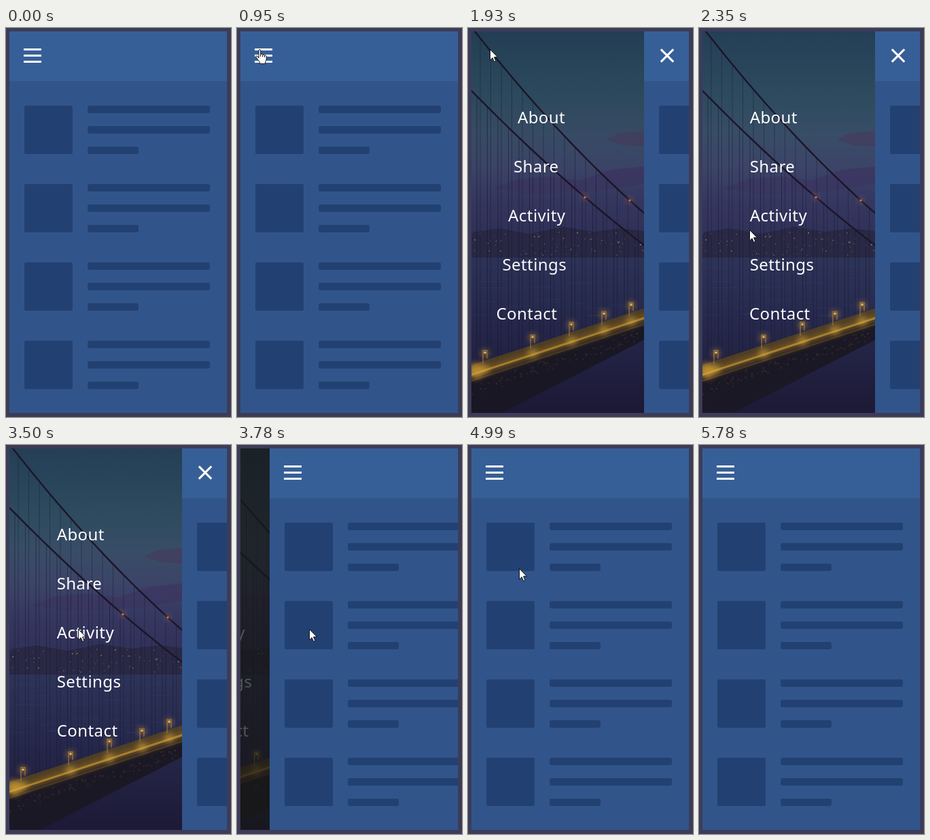
An HTML page for the animation above (6.13 s loop, 331x571 px).

```html
<!DOCTYPE html>
<html lang="en">
<head>
<meta charset="utf-8">
<title>Slide-out menu</title>
<style>
  html, body { margin: 0; width: 100%; height: 100%; overflow: hidden; background: #3c3c58; }
  svg { display: block; width: 331px; height: 571px; }
  text { font: 24px "Noto Sans", "Open Sans", sans-serif; letter-spacing: .42px; fill: #fff; }
</style>
</head>
<body>
<svg viewBox="0 0 331 571">
  <defs>
    <clipPath id="screen"><rect x="5" y="5" width="320" height="560"/></clipPath>
    <linearGradient id="sky" x2="0" y2="1">
      <stop offset="0" stop-color="#243f56"/>
      <stop offset=".3" stop-color="#2e4b5f"/>
      <stop offset=".45" stop-color="#384d66"/>
      <stop offset=".6" stop-color="#3c4468"/>
      <stop offset=".75" stop-color="#353760"/>
      <stop offset="1" stop-color="#2e2d55"/>
    </linearGradient>
    <linearGradient id="water" x2="0" y2="1">
      <stop offset="0" stop-color="#2d3459"/>
      <stop offset=".4" stop-color="#26294d"/>
      <stop offset="1" stop-color="#1d1936"/>
    </linearGradient>
    <filter id="soft" x="-50%" y="-50%" width="200%" height="200%"><feGaussianBlur stdDeviation="4"/></filter>
  </defs>
  <rect width="331" height="571" fill="#3c3c58"/>
  <g clip-path="url(#screen)">
    <rect x="5" y="5" width="320" height="560" fill="#171717"/>
    <g id="menu"><g id="scene"></g><g id="labels"></g></g>
    <g id="pane">
      <rect x="5" y="5" width="320" height="560" fill="#31558a"/>
      <rect x="5" y="5" width="320" height="73" fill="#375f97"/>
    </g>
  </g>
  <g id="cursor" fill="#fff" stroke="#111">
    <path id="arrow" d="M.5 .5V16.2L4.1 12.8 6.6 18.5 9 17.5 6.5 11.8H11.5Z"/>
    <g id="hand" transform="translate(-5)">
      <path d="M5 13V2Q5 .6 6.3 .6T7.7 2V7.5Q9.8 6.4 10.6 8.2 12.6 7.3 13.4 9.2 16.2 8.5 16.2 11V15Q16 17.5 14.6 19V21.4H6.6V19.3Q4.7 17.2 3 14.5L.8 11.5Q.6 9.6 2.6 10Z"/>
      <path d="M7.7 7.5V11M10.6 8.5V11.5M13.4 9.4V12"/>
    </g>
  </g>
</svg>
<script>
const LOOP = 6130;
const PANE_SHIFT = 254, SCENE_SHIFT = 80, LABEL_SHIFT = 177;
const OPEN_AT = 1415, CLOSE_AT = 3495;
const $ = id => document.getElementById(id);

function add(parent, tag, attrs) {
  const node = document.createElementNS('http://www.w3.org/2000/svg', tag);
  for (const name in attrs) node.setAttribute(name, attrs[name]);
  return parent.appendChild(node);
}
const path = (d, attrs) => add($('scene'), 'path', { d, fill: 'none', ...attrs });
const dot = (cx, cy, r, fill, attrs) => add($('scene'), 'circle', { cx, cy, r, fill, ...attrs });
const rect = (parent, x, y, width, height, fill, rx = 0) =>
  add(parent, 'rect', { x, y, width, height, fill, rx });

let seed = 11;
const random = () => (seed = seed * 16807 % 2147483647) / 2147483647;
const between = (low, high) => low + (high - low) * random();

const upperCable = x => 5 + 1.27 * (x - 10) - .0008 * (x - 10) ** 2;
const lowerCable = x => 92 + 1.02 * (x - 5) - .0005 * (x - 5) ** 2;
const deck = x => 507 - .327 * (x - 5);

function curve(heightAt) {
  const points = [];
  for (let x = 5; x <= 265; x += 10) points.push([x, heightAt(x)]);
  return 'M' + points.join('L');
}

function drawScene() {
  const scene = $('scene');
  const soft = 'url(#soft)';
  rect(scene, 5, 5, 254, 333, 'url(#sky)');
  path('M203 164L222 154 259 151V174L228 172Z', { fill: '#473a5c', opacity: .6 });
  path('M35 236L72 222 120 218 165 224 210 208 259 203V228L190 240 90 243Z', { fill: '#3b3260', opacity: .55 });
  path('M5 300L45 294 90 302 140 292 185 299 225 294 259 298V338H5Z', { fill: '#292845' });
  rect(scene, 5, 337, 254, 228, 'url(#water)');

  for (let i = 0; i < 85; i++)
    dot(between(6, 258), between(300, 334), between(.4, 1), '#d29a62', { opacity: between(.3, .8) });
  for (let i = 0; i < 24; i++)
    path(`M${between(5, 220)} ${between(343, 428)}h${between(12, 47)}`, { stroke: '#3a416a', opacity: .35 });

  for (let x = 13; x < 259; x += 15.5) {
    path(`M${x} ${lowerCable(x)}V${deck(x)}`, { stroke: '#181529', opacity: .5 });
    path(`M${x + 5} ${upperCable(x + 5)}V${deck(x)}`, { stroke: '#181529', opacity: .4 });
  }
  for (const cable of [upperCable, lowerCable])
    path(curve(cable), { stroke: '#1c1529', 'stroke-width': 2.4 });
  for (const [x, cable] of [[172, lowerCable], [238, upperCable]]) {
    dot(x, cable(x), 4, '#c06a48', { opacity: .5, filter: soft });
    dot(x, cable(x), 1.5, '#c98055');
  }

  // Bridge deck, speckled truss and street lights
  path(`M5 ${deck(5)}L259 ${deck(259)}V458L50 565H5Z`, { fill: '#1b1825' });
  for (let i = 0; i < 110; i++) {
    const x = between(5, 259);
    dot(x, deck(x) + between(16, 34), between(.6, 1.5), '#3a2f2c', { opacity: .7 });
  }
  const lane = (dy, stroke, width, attrs) =>
    path(curve(x => deck(x) + dy), { stroke, 'stroke-width': width, ...attrs });
  lane(-5, '#594420', 14, { opacity: .8 });
  lane(3, '#8f6a22', 9, { opacity: .7, filter: soft });
  lane(2, '#b98c30', 3, { opacity: .8 });
  lane(11, '#4d3b22', 2);
  dot(12, 503, 11, '#e0a838', { opacity: .7, filter: soft });
  for (const x of [25, 95, 152, 200, 240]) {
    const y = deck(x) - 27;
    path(`M${x - 3} ${y + 20}V${y}H${x + 3}V${y + 12}`, { stroke: '#92703a', 'stroke-width': 1.2 });
    dot(x, y + 4, 6, '#d99c38', { opacity: .5, filter: soft });
    dot(x, y + 3, 1.8, '#e0b458');
    dot(x, deck(x), 7, '#e8b845', { opacity: .5, filter: soft });
  }
}

drawScene();
const labels = ['About', 'Share', 'Activity', 'Settings', 'Contact'].map((word, i) => {
  const label = add($('labels'), 'text', { x: 74.7, y: 140 + 72 * i });
  label.textContent = word;
  return label;
});
for (let y = 114; y < 565; y += 115) {
  rect($('pane'), 27, y, 71, 71, '#224172', 2);
  [180, 180, 75].forEach((width, i) => rect($('pane'), 120, y + 30 * i, width, 11, '#224172', 3));
}
const bars = [-1, 0, 1].map(() => rect($('pane'), -13, -1.5, 26, 3, '#fff', .5));

// The CSS "ease" curve: cubic-bezier(.25, .1, .25, 1)
function ease(t) {
  if (t <= 0 || t >= 1) return t <= 0 ? 0 : 1;
  const bezier = (a, b, s) => 3 * a * s * (1 - s) ** 2 + 3 * b * s * s * (1 - s) + s ** 3;
  let low = 0, high = 1;
  for (let i = 0; i < 20; i++) {
    const mid = (low + high) / 2;
    if (bezier(.25, .25, mid) < t) low = mid; else high = mid;
  }
  return bezier(.1, 1, low);
}

// Motion advances in visible steps
const hold = (time, from, step) => from + Math.floor((time - from) / step) * step;

const move = (node, x, y = 0, angle = 0) =>
  node.setAttribute('transform', `translate(${x} ${y}) rotate(${angle})`);

function renderMenu(time) {
  const closing = time >= 3630;
  const now = closing ? hold(time, 3630, 130) : Math.max(0, hold(time, 1650, 130));
  const visible = closing || time >= 1650;
  const shown = (openMs, closeMs = openMs) => {
    if (!visible) return 0;
    return closing ? 1 - ease((now - CLOSE_AT) / closeMs) : ease((now - OPEN_AT) / openMs);
  };

  const slide = shown(500);
  move($('pane'), PANE_SHIFT * slide);
  move($('scene'), SCENE_SHIFT * (slide - 1));
  $('menu').setAttribute('opacity', shown(600));
  labels.forEach((label, i) => move(label, LABEL_SHIFT * (shown(570 + 100 * i, 500) - 1)));

  const gather = shown(250), turn = shown(500, 250);
  bars.forEach((bar, i) => {
    const side = i - 1;
    move(bar, 39, 40.5 + 9 * side * (1 - gather), -45 * side * turn);
  });
  bars[1].setAttribute('opacity', 1 - gather);
}

// Cursor stops: time, x, y
const stops = [
  [530, 294, 131], [800, 57, 56], [935, 32, 31], [1880, 32, 31],
  [2285, 74, 296], [2555, 97, 311], [2690, 106, 266], [2825, 106, 257],
  [3095, 106, 257], [3230, 106, 270], [4445, 106, 270], [4580, 99, 242],
  [4985, 75, 181], [5120, 75, 181], [5525, 262, 514], [5660, 308, 565]
];

function renderCursor(time) {
  const now = hold(time, 530, 135);
  const next = stops.findIndex(stop => stop[0] > now);
  $('cursor').style.display = time < 530 || time >= 5780 ? 'none' : '';
  if (next === 0) return;
  const to = stops.at(next), from = next < 0 ? to : stops[next - 1];
  const t = next < 0 ? 0 : (now - from[0]) / (to[0] - from[0]);
  move($('cursor'), ...[1, 2].map(k => Math.round(from[k] + (to[k] - from[k]) * t)));

  const pointing = now >= 935 && now < 1600 || now >= 2690 && now < 3230;
  $('hand').style.display = pointing ? '' : 'none';
  $('arrow').style.display = pointing ? 'none' : '';
}

const start = performance.now();
function tick() {
  const time = (performance.now() - start) % LOOP;
  renderMenu(time);
  renderCursor(time);
  requestAnimationFrame(tick);
}
tick();
</script>
</body>
</html>
```
